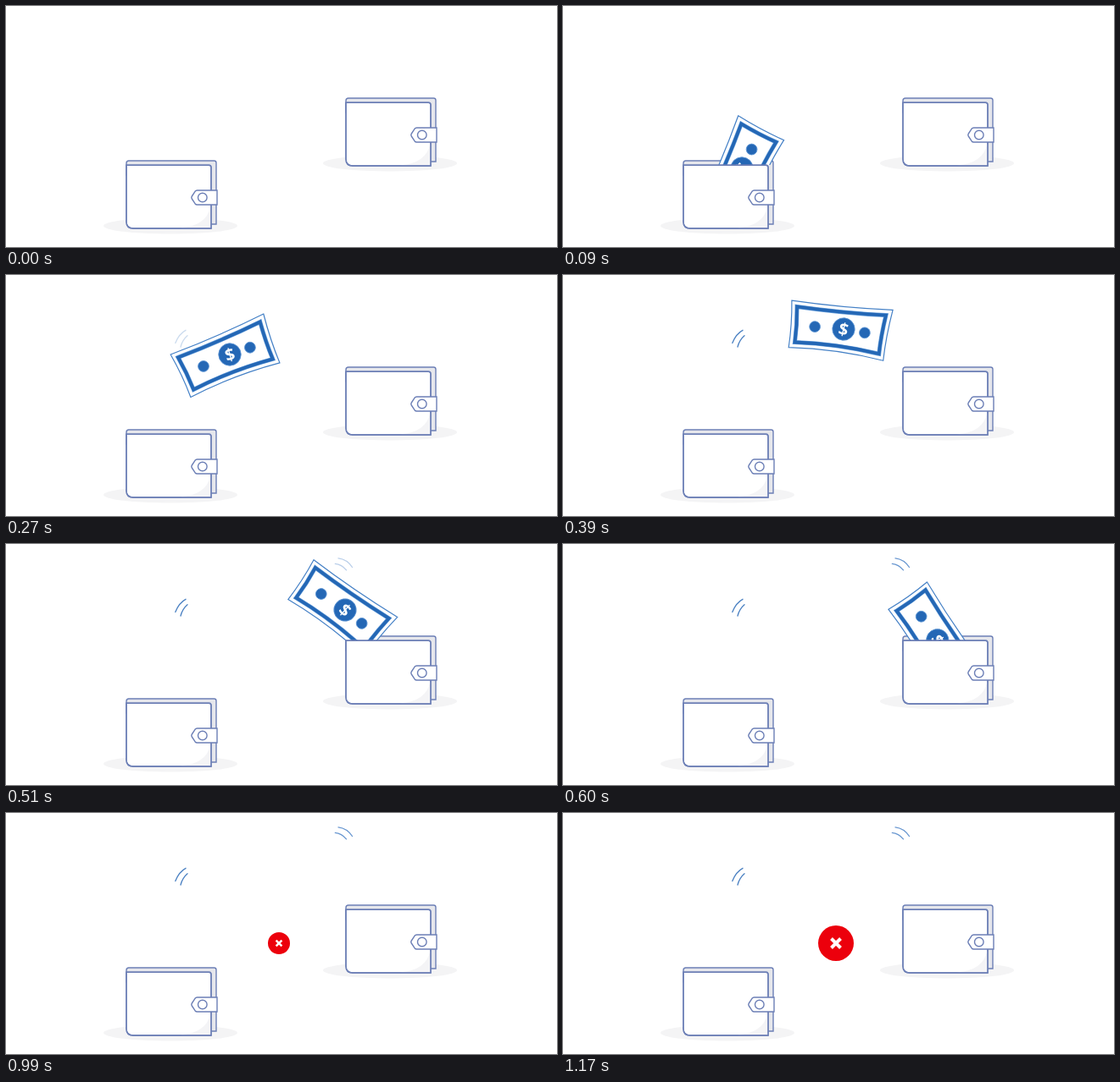
Write an HTML page that moves like this. It is 650 by 285 pixels and loops after 1530 ms.

```html
<!DOCTYPE html>
<html lang="en">
<head>
<meta charset="utf-8">
<title>Failed transfer</title>
<style>
  html, body { margin: 0; height: 100%; overflow: hidden; background: #fff; }
  svg { display: block; width: 100vw; height: 100vh; }
  .sign { font: bold 20px "Open Sans", "Noto Sans", sans-serif; fill: #fff; text-anchor: middle; }
</style>
</head>
<body>
<svg viewBox="0 0 650 285" fill="none">
  <defs>
    <clipPath id="slot"><rect id="slotBox" width="650" height="188"/></clipPath>
    <g id="back">
      <ellipse cx="194" cy="260" rx="79" ry="9.5" fill="#f4f4f5"/>
      <path d="M142 200V186Q142 183 145 183H245.5Q248 183 248 185.5V258H235Z"
        fill="#e6e7ec" stroke="#6c7fb6" stroke-width="1.4"/>
    </g>
    <g id="front" stroke="#6c7fb6" stroke-width="1.4">
      <path d="M142 188.3H239.5Q242 188.3 242 191V263H150Q142 263 142 255Z" fill="#fff"/>
      <path d="M241.3 237Q237 260 206 262.3H241.3Z" fill="#f4f4f6" stroke="none"/>
      <path d="M142 188.3H239.5Q242 188.3 242 191V263H150Q142 263 142 255Z"/>
      <path d="M249 218H225.5Q224 218 223 219.3L219.3 225Q218.3 226.5 219.3 228L223 233.7Q224 235 225.5 235H249Z" fill="#fff"/>
      <circle cx="231.8" cy="226.5" r="5.3"/>
    </g>
  </defs>

  <use href="#back"/>
  <use href="#back" x="259" y="-74"/>

  <g clip-path="url(#slot)">
    <g id="bill">
      <path d="M-64 -28Q-4 -25 55.7 -28Q50.5 4 50 32.7Q-6 24 -62.5 27.7Q-61 0 -64 -28Z"
        fill="#fff" stroke="#4480c6" stroke-width="1.2"/>
      <path d="M-57.2 -21.3Q-4 -18.8 48.2 -21Q44.6 4 44.3 25.2Q-6 17.8 -55.8 20.8Q-55 0 -57.2 -21.3Z"
        stroke="#69a0dc" stroke-width="5"/>
      <path d="M-57.2 -21.3Q-4 -18.8 48.2 -21Q44.6 4 44.3 25.2Q-6 17.8 -55.8 20.8Q-55 0 -57.2 -21.3Z"
        stroke="#2467b5" stroke-width="3.8"/>
      <g fill="#2467b5" stroke="#5b94d4" stroke-width=".8">
        <circle r="13.2"/>
        <circle cx="-34" cy=".3" r="6.4"/>
        <circle cx="25.2" cy="2" r="6.4"/>
      </g>
      <text class="sign" y="7.2" transform="rotate(8)">$</text>
    </g>
  </g>

  <use href="#front"/>
  <use href="#front" x="259" y="-74"/>

  <g stroke-width="1.3" stroke-linecap="round">
    <path id="liftMarks" stroke="#4a80c2" d="M199.8 80.5Q204 69.5 212 65.3M206 85Q208 77 214 71.8"/>
    <path id="dropMarks" stroke="#6796d0" d="M392 16.8Q402.5 18 408.5 27.5M388.3 23.3Q396 24 401.5 30.8"/>
  </g>

  <g id="badge">
    <circle r="21" fill="#ec000c"/>
    <path d="M-5.5 -5.5L5.5 5.5M5.5 -5.5L-5.5 5.5" stroke="#fff" stroke-width="4"/>
  </g>
</svg>
<script>
const LOOP = 1530, STEP = 30;
const el = id => document.getElementById(id);
const ramp = (t, from, to) => Math.min(1, Math.max(0, (t - from) / (to - from)));

// Flight path of the bill's coin: time, x, y
const path = [
  [0, 207, 247], [90, 211, 192], [180, 230, 139], [270, 264, 94],
  [390, 331, 64], [510, 400, 78], [630, 452, 128], [750, 470, 190]
];

function slope(i, axis) {
  const a = path[Math.max(0, i - 1)], b = path[Math.min(path.length - 1, i + 1)];
  return (b[axis] - a[axis]) / (b[0] - a[0]);
}

// Cubic Hermite interpolation along the path
function along(t, axis) {
  let i = 0;
  while (i < path.length - 2 && t >= path[i + 1][0]) i++;
  const a = path[i], b = path[i + 1], span = b[0] - a[0];
  const u = (t - a[0]) / span, v = 1 - u;
  return v * v * (1 + 2 * u) * a[axis] + u * u * (1 + 2 * v) * b[axis]
    + span * u * v * (v * slope(i, axis) - u * slope(i + 1, axis));
}

function draw(t) {
  const flying = t > 0 && t < 750;
  el("bill").setAttribute("visibility", flying ? "visible" : "hidden");
  if (flying) {
    const angle = -89 + 0.242 * t;
    el("bill").setAttribute("transform", `translate(${along(t, 1)} ${along(t, 2)}) rotate(${angle})`);
  }
  // The bill leaves the lower wallet, then sinks into the upper one
  el("slotBox").setAttribute("height", t < 360 ? 188 : 114);

  el("liftMarks").setAttribute("opacity", ramp(t, 230, 370));
  el("dropMarks").setAttribute("opacity", ramp(t, 450, 580));

  const scale = 1.24 * ramp(t, 900, 1080) - 0.24 * ramp(t, 1080, 1170);
  el("badge").setAttribute("transform", `translate(322 154) scale(${scale})`);
}

function tick() {
  draw(Math.floor((performance.now() % LOOP) / STEP) * STEP);
  requestAnimationFrame(tick);
}
tick();
</script>
</body>
</html>
```
